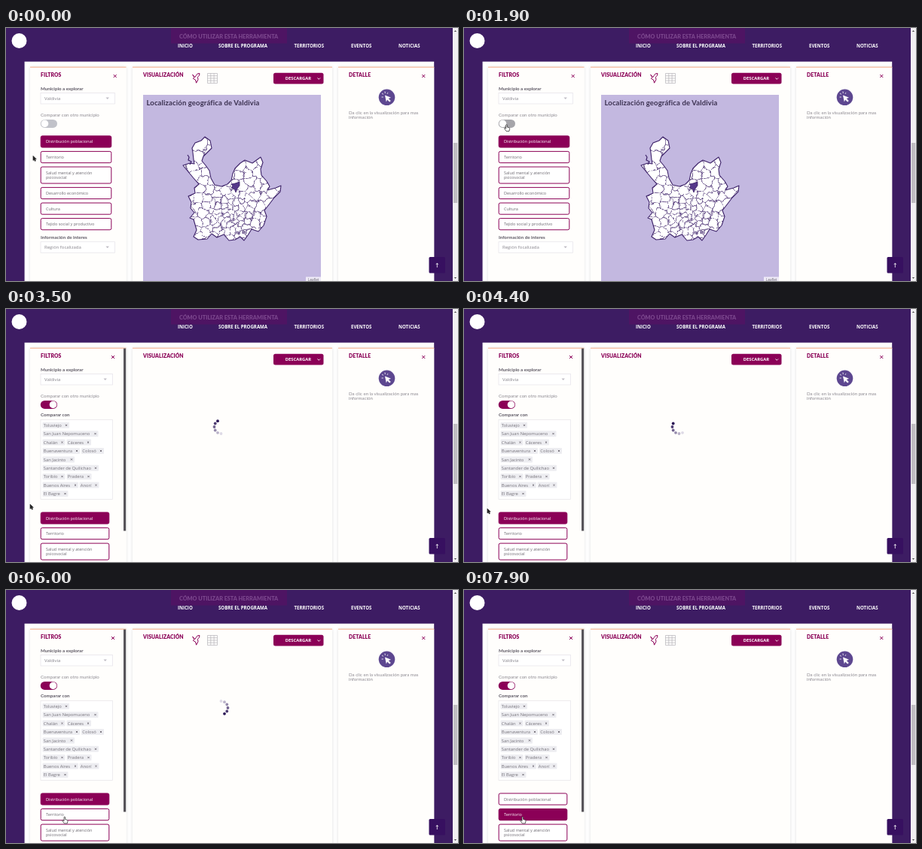
Recreate the animation shown at these times as an HTML page. Size 600 by 337 pixels, loop 8000 ms.

```html
<!DOCTYPE html>
<html lang="es">
<head>
<meta charset="utf-8">
<style>
html, body { margin: 0; width: 100%; height: 100%; overflow: hidden; background: #3d1c63; }
svg { display: block; width: 100vw; height: 100vh; }
text { font-family: "Open Sans", sans-serif; white-space: pre; }
.nav { font-size: 6.1px; font-weight: 700; fill: #fff; }
.head, .label, .light, .title, .ghost { font-family: Lato, sans-serif; }
.head { font-size: 6.8px; font-weight: 900; fill: #8b0057; letter-spacing: .1px; }
.label { font-size: 6.2px; font-weight: 700; fill: #5d5864; }
.light { font-size: 6.1px; fill: #8d8a92; }
.title { font-size: 9.5px; font-weight: 700; fill: #3b3150; letter-spacing: .13px; }
.ghost { font-size: 7.3px; font-weight: 900; fill: #7a458c; }
.item { font-size: 5.5px; fill: #6c6870; }
.tag { font-size: 5.8px; fill: #747179; }
.field { font-size: 6px; fill: #85828a; }
</style>
</head>
<body>
<svg id="stage" viewBox="0 0 600 337" preserveAspectRatio="none"></svg>
<script>
const LOOP = 8000, MAGENTA = '#8b0057', INK = '#3c2168';
const COMPARE_AT = 2300, SPIN_AT = 2900, ICONS_AT = 5200, PICK_AT = 7000;

const text = (x, y, cls, str, extra = '') => `<text x="${x}" y="${y}" class="${cls}" ${extra}>${str}</text>`;
const rect = (x, y, w, h, fill, extra = '') =>
  `<rect x="${x}" y="${y}" width="${w}" height="${h}" fill="${fill}" ${extra}/>`;
const path = (d, stroke, width = 1, fill = 'none', extra = '') =>
  `<path d="${d}" stroke="${stroke}" stroke-width="${width}" fill="${fill}" ${extra}/>`;
const cross = (x, y, r = 2, color = MAGENTA, w = 1) =>
  path(`M${x - r} ${y - r}l${2 * r} ${2 * r}m0 ${-2 * r}l${-2 * r} ${2 * r}`, color, w);
const toPath = points => 'M' + points.map(p => p.map(v => v.toFixed(1)).join(' ')).join('L') + 'Z';

// Region outline, filled with Voronoi cells that shrink towards the dense centre.
const OUTLINE = 'M264 145L271 150 273 160 267 166 262 171 260 177 265 183 270 190 272 200 277 209 286 211 294 208 299 203 301 194 304 187 311 180 317 176 327 180 338 172 341 179 338 188 339 196 346 204 350 211 347 216 358 213 365 210 364 218 356 226 350 234 343 243 346 251 342 263 335 271 326 268 321 276 316 283 311 278 304 282 296 283 289 275 280 279 273 274 267 281 255 282 249 278 253 269 251 262 249 255 244 253 250 246 245 240 246 232 242 224 251 220 250 213 256 208 249 200 244 194 239 188 235 183 244 180 250 181 249 175 248 166 247 160 251 153 259 150Z';

function makeSites() {
  let seed = 11;
  const random = () => (seed = (seed * 16807) % 2147483647) / 2147483647;
  const sites = [];
  for (let i = 0; i < 6000; i++) {
    const p = [232 + random() * 136, 142 + random() * 145];
    const gap = 4.4 + Math.hypot(p[0] - 300, p[1] - 250) / 10;
    if (sites.every(s => Math.hypot(s[0] - p[0], s[1] - p[1]) > gap)) sites.push(p);
  }
  return sites;
}

function cellAround(a, sites) {
  let cell = [[225, 135], [375, 135], [375, 295], [225, 295]];
  for (const b of sites) {
    if (b === a) continue;
    const nx = b[0] - a[0], ny = b[1] - a[1];
    const side = p => (p[0] - (a[0] + b[0]) / 2) * nx + (p[1] - (a[1] + b[1]) / 2) * ny;
    cell = cell.flatMap((p, i) => {
      const q = cell[(i + 1) % cell.length], sp = side(p), sq = side(q), k = sp / (sp - sq);
      const kept = sp <= 0 ? [p] : [];
      if (sp * sq < 0) kept.push([p[0] + (q[0] - p[0]) * k, p[1] + (q[1] - p[1]) * k]);
      return kept;
    });
  }
  return toPath(cell);
}

function regionMap() {
  const sites = makeSites();
  return rect(182, 89, 236, 248, '#c3b8e0') +
    text(186.5, 102.5, 'title', 'Localización geográfica de Valdivia') +
    path(OUTLINE, 'none', 0, '#fff') +
    `<g clip-path="url(#region)"><g filter="url(#ragged)">${path(sites.map(s => cellAround(s, sites)).join(''), INK, .5)}</g></g>` +
    path(OUTLINE, INK, 1.1, 'none', 'stroke-linejoin="round"') +
    path('M241 169l2 3-1 4 4 2-2 4', INK, 1.2) +
    path('M299 208l5-1 6-2 0 5-3 4-2 5-2-5-4-1 2-3z', INK, .8, '#55388a') +
    rect(398, 331.5, 20, 6, '#eeeaf7') + text(401, 337, 'item', 'Leaflet', 'style="font-size:4.6px"');
}

const ITEMS = [['Distribución poblacional'], ['Territorio'], ['Salud mental y atención', 'psicosocial'],
  ['Desarrollo económico'], ['Cultura'], ['Tejido social y productivo']];

function buttons(right, top) {
  return ITEMS.map((lines, i) => {
    const h = lines.length > 1 ? 22 : 15.2, y = top;
    top += h + 5.4;
    return `<g class="button">${rect(46.2, y, right - 46.2, h, i ? '#fff' : MAGENTA, `rx="2" stroke="${MAGENTA}"`)}` +
      lines.map((line, k) => text(53, y + 9.6 + k * 6.3, 'item', line, i ? '' : 'style="fill:#fff"')).join('') + '</g>';
  }).join('');
}

const select = (y, right, value) =>
  rect(46, y, right - 46, 14.5, '#fff', 'stroke="#e4e2e8" stroke-width=".7"') +
  text(51, y + 9.6, 'field', value) +
  path(`M${right - 12} ${y + 6}h4.4l-2.2 2.4z`, 'none', 0, '#bfbcc4');

// Each tag: name, left edge, position of its cross.
const TAG_ROWS = [[['Toluviejo', 49, 80]], [['San Juan Nepomuceno', 49, 118.5]],
  [['Chalán', 49, 74.5], ['Cáceres', 81, 109]], [['Buenaventura', 49, 94], ['Colosó', 100.5, 126]],
  [['San Jacinto', 49, 87]], [['Santander de Quilichao', 49, 119]],
  [['Toribío', 49, 74.5], ['Pradera', 81, 109.5]], [['Buenos Aires', 49, 92], ['Anorí', 98, 119.5]],
  [['El Bagre', 49, 78.5]]];

const tags = () => TAG_ROWS.map((row, i) => row.map(([name, x, end]) => {
  const y = 154.8 + i * 11.4;
  return rect(x - .5, y - 4, end - x + 4.5, 8, '#ededf1', 'rx="1"') +
    text(x + .8, y + 2.1, 'tag', name) + cross(end, y, 1.1, '#625e68', .8);
}).join('')).join('');

const card = (x, w) => rect(x, 52, w, 300, '#fffefc', 'filter="url(#shadow)"') + rect(x, 51.7, w, .9, '#f4a57c');

const HAND = 'M-.8 0q.8-.9 1.6 0v3l2.7.8q.9.4.7 1.6l-.7 3h-4l-2.4-3.4q0-1.2 1.4-.6l.7.7z';
const ARROW = 'M0 .4v6l1.4-1.2 1 2.2 1-.5-1-2.1 1.8-.2z';

const stage = document.getElementById('stage');
stage.innerHTML = `<defs><clipPath id="region"><path d="${OUTLINE}"/></clipPath>
  <clipPath id="page"><rect x="24.6" y="44.7" width="543.6" height="293"/></clipPath>
  <filter id="ragged"><feTurbulence type="fractalNoise" baseFrequency=".11" numOctaves="2" seed="4"/>
    <feDisplacementMap in="SourceGraphic" scale="9" xChannelSelector="R" yChannelSelector="G"/></filter>
  <filter id="shadow" x="-10%" y="-5%" width="120%" height="110%"><feDropShadow dx="0" dy="0" stdDeviation="2" flood-color="#000" flood-opacity=".12"/></filter></defs>` +
  rect(0, 0, 600, 337, '#3d1c63') +
  rect(219, 0, 154, 20.5, '#4e1463') + text(230, 14, 'ghost', 'CÓMO UTILIZAR ESTA HERRAMIENTA') +
  '<circle cx="17.5" cy="17" r="10" fill="#fff"/>' +
  [['INICIO', 228], ['SOBRE EL PROGRAMA', 282], ['TERRITORIOS', 382.5], ['EVENTOS', 458], ['NOTICIAS', 521]]
    .map(([s, x]) => text(x, 26.4, 'nav', s)).join('') +
  `<g clip-path="url(#page)">${rect(24, 44, 546, 294, '#fff')}${card(32, 127.5)}${card(168, 265)}${card(441, 130)}</g>` +
  text(46, 65.2, 'head', 'FILTROS') + text(182, 65.2, 'head', 'VISUALIZACIÓN') + text(455, 65.2, 'head', 'DETALLE') +
  cross(554.3, 64) +
  rect(355, 59.8, 66.5, 14.8, MAGENTA, 'rx="2.5"') +
  text(370.8, 69.4, 'nav', 'DESCARGAR', 'style="font-size:5.8px"') + path('M413.5 66.5l1.8 1.8 1.8-1.8', '#fff', .9) +
  `<g id="icons">${path('M247.6 62.2l3.4 3.3 1.4-2.3 1.8-2.3 2.8-.4-.6 2.8-2 2.2.6 3.2-2.4 4.5-1.2-4.2-3-1.6 1.4-1.6z', MAGENTA, 1, '#fff')}
    ${path('M267.5 60.5h13v13h-13zM267.5 63.7h13m-13 3.3h13m-13 3.2h13M271.8 60.5v13m4.3-13v13', '#b5b3b9', .7)}</g>` +
  '<circle cx="505.5" cy="92.3" r="10.8" fill="#5d4790"/>' +
  path('M503 89.5l8 3.2-3.2 1.3 3 3-1.7 1.6-3-3-1.3 3z', 'none', 0, '#fff') +
  path('M499 87l2 1.4M503 84.5l.3 2.5M498.5 92h2.4M507 86l-1 1.8', '#fff', .8) +
  text(455, 114.8, 'light', 'Da clic en la visualización para mas') + text(455, 121, 'light', 'información') +
  text(46, 82.5, 'label', 'Municipio a explorar') + text(46, 118, 'light', 'Comparar con otro municipio') +
  `<g id="single">${cross(144.7, 64)}${select(86.5, 144.5, 'Valdivia')}${buttons(139.8, 143.8)}
    ${text(46, 280.8, 'label', 'Información de interes')}${select(284.8, 144.5, 'Región focalizada')}${regionMap()}</g>` +
  `<g id="compare">${cross(142, 64)}${select(86.5, 141.5, 'Valdivia')}${text(46, 143.2, 'label', 'Comparar con')}
    ${rect(46, 147.5, 95.5, 106, '#fff', 'stroke="#e6e4e9" stroke-width=".7"')}${tags()}${buttons(136.8, 270.9)}
    ${rect(156, 52.5, 3.2, 243, '#57545a')}</g>` +
  rect(45.8, 121.9, 22.2, 11, '#c1c2c9', 'id="track" rx="5.5"') +
  '<circle id="knob" cy="127.4" r="4.8" fill="#fff"/><g id="spinner"></g>' +
  rect(561.5, 305, 21.5, 21.5, '#371060', 'rx="1.5"') + path('M572.3 319v-5.5m-1.5 1.6l1.5-1.8 1.5 1.8', '#fff', .8) +
  rect(593, 0, 7, 337, '#f1f0f2') + rect(594, 153, 5.2, 80, '#bfbdc1') +
  path('M594.9 5l1.6-2 1.6 2zM594.9 332l1.6 2 1.6-2z', 'none', 0, '#555') +
  path('', '#222', .7, '#fff', 'id="pointer"');

const el = id => document.getElementById(id);
const show = (id, on) => el(id).style.display = on ? '' : 'none';
const clamp = v => Math.max(0, Math.min(1, v));
const mix = (a, b, k) => `rgb(${a.map((v, i) => Math.round(v + (b[i] - v) * k))})`;
const PINK = [139, 0, 87], WHITE = [255, 255, 255], GREY = [108, 104, 112];
const TRACK = [193, 194, 201], TRACK_HOVER = [166, 165, 170];
const [firstButton, secondButton] = el('compare').querySelectorAll('.button');

// Pointer stops: time, x, y.
const STOPS = [[0, 36, 170], [400, 36, 170], [1400, 56.5, 129], [2800, 56.5, 129],
  [3600, 31, 265.5], [4450, 31, 265.5], [5000, 77.8, 302.5], [LOOP, 77.8, 302.5]];

function pointerAt(t) {
  const i = STOPS.findIndex(s => s[0] > t), [t0, x0, y0] = STOPS[i - 1], [t1, x1, y1] = STOPS[i];
  const k = (t - t0) / (t1 - t0), e = k * k * (3 - 2 * k);
  return [x0 + (x1 - x0) * e, y0 + (y1 - y0) * e];
}

function drawSpinner(t) {
  const head = 210 + 30 * Math.floor((t - 4400) * .012 + .1);
  el('spinner').innerHTML = [0, 1, 2, 3, 4, 5].map(i => {
    const a = (head - 30 * i) * Math.PI / 180;
    return `<circle cx="${285.5 + 9 * Math.cos(a)}" cy="${157 + 9 * Math.sin(a)}" r="1.9" fill="${mix([42, 20, 85], [222, 218, 230], i / 5)}"/>`;
  }).join('');
}

function paintButton(button, active) {
  button.querySelector('rect').setAttribute('fill', mix(WHITE, PINK, active));
  button.querySelector('text').style.fill = mix(GREY, WHITE, active);
}

function render(t) {
  const comparing = t >= COMPARE_AT, spinning = t >= SPIN_AT && t < PICK_AT;
  show('single', !comparing);
  show('compare', comparing);
  show('icons', !comparing || t >= ICONS_AT);
  show('spinner', spinning);
  if (spinning) drawSpinner(t);

  const picked = clamp((t - PICK_AT) / 220);
  paintButton(firstButton, 1 - picked);
  paintButton(secondButton, picked);

  const [x, y] = pointerAt(t);
  const overToggle = x > 46 && x < 68 && y > 122 && y < 133;
  const overButton = x > 46 && x < 140 && (comparing ? y > 271 : y > 144 && y < 269);
  const pointer = el('pointer');
  pointer.setAttribute('d', overToggle || overButton ? HAND : ARROW);
  pointer.setAttribute('fill', overToggle || overButton ? '#fff' : '#222');
  pointer.setAttribute('transform', `translate(${x} ${y})`);

  const on = clamp((t - COMPARE_AT) / 200);
  el('track').setAttribute('fill', mix(overToggle ? TRACK_HOVER : TRACK, PINK, on));
  el('knob').setAttribute('cx', 51.5 + 11 * on);
}

const start = performance.now();
function tick() {
  render((performance.now() - start) % LOOP);
  requestAnimationFrame(tick);
}
tick();
</script>
</body>
</html>
```
